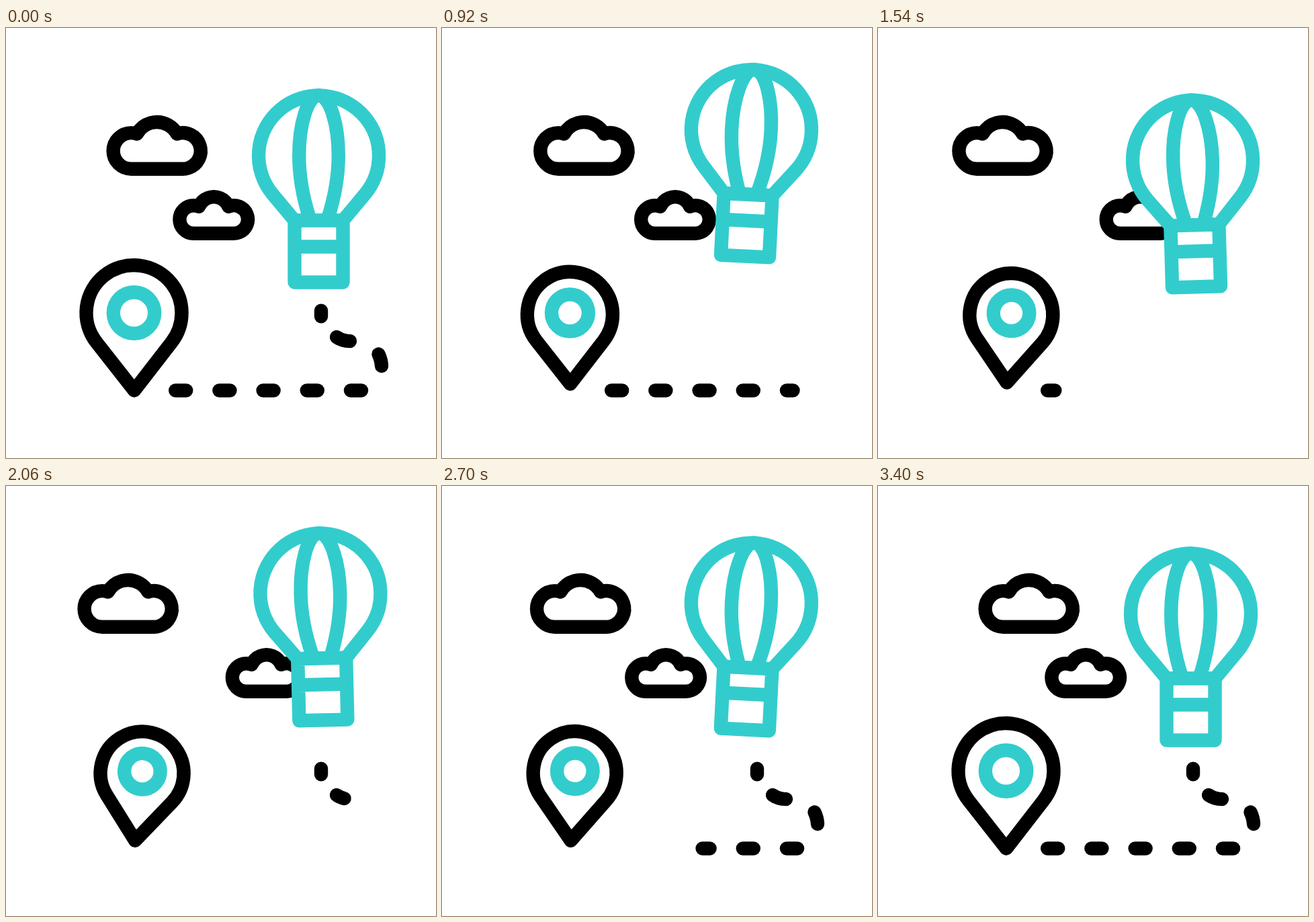
An HTML page with a canvas for the animation above (3.46 s loop, 640x640 px).

```html
<!DOCTYPE html>
<html lang="en">
<head>
<meta charset="utf-8">
<title>Balloon trip</title>
<style>
  html, body { margin: 0; width: 100%; height: 100%; overflow: hidden; background: #fff; }
  canvas { display: block; width: 100vw; height: 100vh; }
</style>
</head>
<body>
<canvas id="stage" width="640" height="640"></canvas>
<script>
const ctx = document.getElementById('stage').getContext('2d');
const LOOP = 3460, STEP = 20;
const INK = '#000', TEAL = '#33cccd';
const { PI } = Math;
const RAD = PI / 180;

// Eased 0 to 1 between times a and b.
function rise(t, a, b) {
  const u = Math.min(1, Math.max(0, (t - a) / (b - a)));
  return u * u * (3 - 2 * u);
}

// 0 to 1 to 0, with the peak at time b.
const hump = (t, a, b, c) => rise(t, a, b) - rise(t, b, c);

// Out to amp, through a swing the other way, out to amp again, then home.
const sway = (t, amp, swing, a, b, c, d, e) =>
  amp * (rise(t, a, b) - rise(t, d, e)) - swing * hump(t, b, c, d);

function stroke(color) {
  ctx.strokeStyle = color;
  ctx.stroke();
}

// Point k of the trail: a short quadratic curve; the last five lie flat.
function dash(k) {
  if (k === 0) return [469, 420.7, 469, 425, 469, 429.3];
  if (k === 1) return [492, 460, 501, 466, 512, 466];
  if (k === 2) return [554.5, 485.5, 558.5, 494, 559, 503];
  const x = 529 - 65.2 * (k - 3);
  return [x, 539.5, x - 8, 539.5, x - 16, 539.5];
}

// The part of the trail between two distances along it.
function trail(from, to) {
  for (let k = 0; k < 8; k++) {
    const [x0, y0, x1, y1, x2, y2] = dash(k);
    const start = 66 * k - 19, len = Math.hypot(x2 - x0, y2 - y0);
    const a = Math.max(0, (from - start) / len);
    const b = Math.min(1, (to - start) / len);
    if (a > b) continue;
    ctx.beginPath();
    for (let i = 0; i <= 8; i++) {
      const u = a + (b - a) * i / 8 + i * 1e-4, v = 1 - u;
      ctx.lineTo(v * v * x0 + 2 * u * v * x1 + u * u * x2, v * v * y0 + 2 * u * v * y1 + u * u * y2);
    }
    stroke(INK);
  }
}

// Two side lobes of radius r at x +- half, with a bump that peaks at top.
function cloud(x, y, half, r, top, inset) {
  const a = Math.asin(inset / r);
  const joint = y - r * Math.cos(a);
  const w = half - inset, h = joint - top;
  const R = (w * w + h * h) / (2 * h);
  const b = Math.asin(w / R);
  ctx.beginPath();
  ctx.arc(x - half, y, r, PI / 2, 1.5 * PI + a);
  ctx.arc(x, top + R, R, 1.5 * PI - b, 1.5 * PI + b);
  ctx.arc(x + half, y, r, 1.5 * PI - a, 2.5 * PI);
  ctx.closePath();
  stroke(INK);
}

// Leans around its foot; the outline grows about its middle, the ring about its own centre.
function pin(scale, lean) {
  const mid = -93.5, a = 0.663;
  ctx.save();
  ctx.translate(190.5, 540);
  ctx.rotate(lean * RAD);
  ctx.beginPath();
  ctx.arc(0, mid - 22.5 * scale, 71 * scale, PI - a, 2 * PI + a);
  ctx.lineTo(0.4, mid + 93 * scale);
  ctx.closePath();
  stroke(INK);
  ctx.beginPath();
  ctx.arc(0, -116, 30.7 * scale, 0, 2 * PI);
  stroke(TEAL);
  ctx.restore();
}

function balloon(lift, tilt) {
  const pivot = 88;
  ctx.save();
  ctx.translate(465.5, pivot + lift);
  ctx.rotate(tilt * RAD);
  ctx.translate(0, -pivot);

  ctx.beginPath();
  ctx.arc(0, 190, 89.5, 0.779 * PI, 2.221 * PI);
  ctx.lineTo(36, 286.5);
  ctx.lineTo(-36, 286.5);
  ctx.closePath();
  ctx.fill();
  stroke(TEAL);

  for (const k of [-1, 1]) {
    ctx.beginPath();
    ctx.moveTo(0, 100.5);
    ctx.bezierCurveTo(17 * k, 100.5, 29.3 * k, 145, 29.3 * k, 190);
    ctx.bezierCurveTo(29.3 * k, 222, 23.5 * k, 252, 14 * k, 282);
    stroke(TEAL);
  }

  ctx.beginPath();
  ctx.rect(-36, 286.5, 72, 92);
  ctx.fill();
  ctx.moveTo(-36, 325.5);
  ctx.lineTo(36, 325.5);
  stroke(TEAL);
  ctx.restore();
}

function render(t) {
  ctx.fillStyle = '#fff';
  ctx.fillRect(0, 0, 640, 640);
  ctx.lineWidth = 20.4;
  ctx.lineCap = ctx.lineJoin = 'round';

  const scale = 1 + 0.13 * hump(t, 150, 543, 1003) - 0.127 * (rise(t, 543, 1003) - rise(t, 2720, 3390));
  const lean = 6.2 * hump(t, 400, 2150, 3400) - 1.7 * hump(t, 160, 400, 2150);
  pin(scale, lean);

  if (t < 1620) trail(520 * rise(t, 208, 1865) - 20, Infinity);
  else trail(-Infinity, 520 * rise(t, 1620, 3400) - 20);

  cloud(224.7 - 45 * hump(t, 385, 1875, 3350), 182.9, 38.3, 26.8, 140, 8.5);
  cloud(309.2 + 87 * hump(t, 190, 1790, 3180), 285, 30, 20.8, 251.3, 8);

  balloon(
    sway(t, -43.5, -50.5, 160, 767, 1554, 2320, 2960),
    sway(t, 3, 6, 330, 1010, 1770, 2610, 3400)
  );
}

function tick() {
  const t = performance.now() % LOOP;
  render(Math.floor(t / STEP) * STEP);
  requestAnimationFrame(tick);
}
tick();
</script>
</body>
</html>
```
